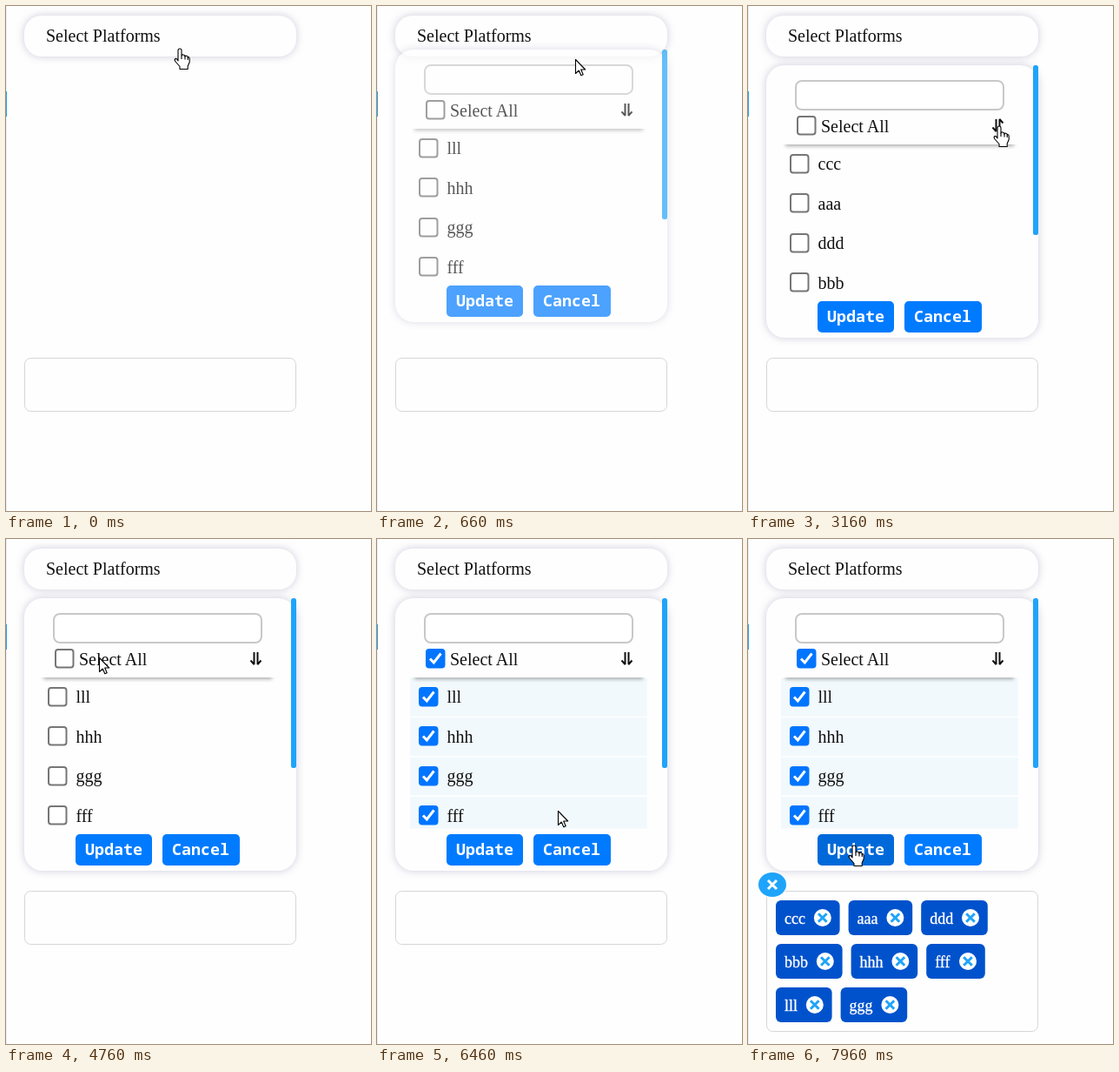
Write an HTML page that moves like this. It is 420 px wide and 580 px high and loops after 8 s.

```html
<!DOCTYPE html>
<html lang="en">
<head>
<meta charset="utf-8">
<title>Platform picker</title>
<style>
  html, body { margin: 0; width: 100%; height: 100%; overflow: hidden; background: #fefefe; }
  svg { display: block; }
  text { font: 20px "Liberation Serif", "Times New Roman", serif; fill: #111; white-space: pre; }
  .card { fill: #fefefe; filter: drop-shadow(0 0 5px rgba(50, 50, 110, .25)); }
  .btn { fill: #007bff; }
  .btn.hover { fill: #0069d9; }
  .btn-text { font: 600 18.33px "Noto Sans Mono", "DejaVu Sans Mono", monospace; fill: #fff; }
  .check rect { fill: #fff; stroke: #767676; stroke-width: 2; }
  .check path { fill: none; stroke: #fff; stroke-width: 3; visibility: hidden; }
  .check.hover rect { stroke: #4f4f4f; }
  .check.on rect { fill: #0075ff; stroke: #0075ff; }
  .check.on.hover rect { fill: #005cc8; stroke: #005cc8; }
  .check.on path { visibility: visible; }
  .row-bg { fill: #f1f9fd; }
  .chip { fill: #0052cc; }
  .chip-text { font-size: 18px; fill: #fff; stroke: #fff; stroke-width: .3; }
  .arrow { fill: none; stroke: #111; stroke-width: 2; stroke-linejoin: bevel; }
  .cursor { fill: #fff; stroke: #000; stroke-width: 1.1; stroke-linejoin: round; }
</style>
</head>
<body>
<svg width="420" height="580" viewBox="0 0 420 580">
  <defs>
    <clipPath id="list-clip"><rect x="30" y="159" width="290" height="173.500"/></clipPath>
    <filter id="soft" x="-10%" y="-300%" width="120%" height="700%"><feGaussianBlur stdDeviation="2.3"/></filter>
  </defs>
  <rect width="420" height="580" fill="#fefefe"/>
  <rect width="1" height="580" fill="#ececfa"/>
  <rect y="98" width="1" height="29" fill="#1d9ff0"/>

  <rect id="box" x="21.500" y="404.500" width="312" height="61" rx="7" fill="#fefefe" stroke="#d6d6d6"/>
  <g id="chips"></g>

  <rect class="card" x="21" y="11" width="313" height="47" rx="20"/>
  <text x="46" y="41">Select Platforms</text>

  <g id="panel">
    <rect class="card" x="21" y="68" width="313" height="313" rx="21"/>
    <rect x="328" y="68" width="6" height="195" rx="2.500" fill="#1fa4fb"/>
    <g id="list" clip-path="url(#list-clip)"></g>
    <rect x="43" y="155" width="263" height="6" fill="#000" opacity=".32" filter="url(#soft)"/>
    <rect x="38" y="80" width="273" height="79" fill="#fefefe"/>
    <rect x="55" y="86" width="239" height="33" rx="7" fill="#fff" stroke="#c8c8c8" stroke-width="2"/>
    <g id="all"></g>
    <text x="84" y="145">Select All</text>
    <path id="sortL" class="arrow" d="M0-7V7L-4 2.500"/>
    <path id="sortR" class="arrow" d="M0-7V7L4 2.500"/>
    <rect id="update" class="btn" x="80" y="339" width="88" height="36" rx="5"/>
    <text class="btn-text" x="91" y="363">Update</text>
    <rect id="cancel" class="btn" x="180" y="339" width="89" height="36" rx="5"/>
    <text class="btn-text" x="191" y="363">Cancel</text>
  </g>

  <path id="arrow" class="cursor" d="M.5.5V16.500L4.300 13 6.800 18.700 9.200 17.700 6.700 12H11.700Z"/>
  <g id="hand" class="cursor">
    <path d="M-2 14V2a2 2 0 0 1 4 0V8q.5-1.500 2-1 1.500 0 2 2 .5-1.300 1.800-.8 1.500.3 1.400 1.900 .4-.7 1.200-.3 .8.500 .8 2V15.500L9.200 20V23.500H0V20.500L-5.300 14.500q-1.200-2 .3-3 1.500-.5 3 2.500Z"/>
    <path fill="none" d="M2 8v4M6 9v3.500M9.200 10v3"/>
  </g>
</svg>
<script>
const LOOP = 8000, OPEN = 455, OPEN_TIME = 500, SELECT = 5360, UPDATE = 7960;
const ROW = 45.4;
const $ = id => document.getElementById(id);
const show = (el, on) => el.style.display = on ? "" : "none";

const names = ["ccc", "aaa", "ddd", "bbb", "hhh", "fff", "lll", "ggg"];
const ascending = [...names].sort();
const orders = [[...ascending].reverse(), names, ascending];
const clicks = [1460, 2060, 2630, 3160, 3700, 4160];

// Pointer stops: time, x, y
const path = [
  [0, 200, 49], [30, 200, 49], [160, 222, 33], [480, 222, 33],
  [660, 228, 61], [900, 259, 101], [1260, 290, 138], [1430, 290, 138],
  [1500, 288, 137], [1899, 288, 137], [1900, 289, 138], [4360, 289, 138],
  [4560, 195, 139], [4760, 107, 136], [5160, 66, 137], [5400, 66, 137],
  [6160, 100, 182], [6460, 208, 312], [6660, 208, 312], [6800, 226, 321],
  [7200, 226, 322], [7350, 212, 350], [7520, 150, 355], [7700, 122, 352],
  [LOOP, 122, 352]
];

const checkbox = (x, y) => `<g class="check" transform="translate(${x} ${y})">
  <rect x="1" y="1" width="20.500" height="20.500" rx="3"/><path d="M5 11.500L9.300 16 17.500 5.500"/></g>`;
const cross = (x, y, r, color) =>
  `<path d="M${x - r} ${y - r}l${2 * r} ${2 * r}m0 ${-2 * r}l${-2 * r} ${2 * r}" stroke="${color}" stroke-width="3"/>`;

$("all").innerHTML = checkbox(56, 126);
$("list").innerHTML = [0, 1, 2, 3].map(i => {
  const y = 160 + i * ROW;
  return `<rect class="row-bg" x="38" y="${y}" width="273" height="43.500"/>
    ${checkbox(48, Math.round(y + 10))}<text class="label" x="80.500" y="${Math.round(y + 28.3)}"></text>`;
}).join("");

function buildChips() {
  const advance = { a: 8, c: 8, f: 6, l: 5 };
  const rows = [names.slice(0, 3), names.slice(3, 6), names.slice(6)];
  let out = "";
  rows.forEach((row, r) => {
    let x = 32;
    const y = 415 + r * 50;
    for (const name of row) {
      const w = 3 * (advance[name[0]] || 9) + 49.6;
      const cx = x + w - 19.8, cy = y + 20;
      out += `<rect class="chip" x="${x}" y="${y}" width="${w}" height="40" rx="6"/>
        <text class="chip-text" x="${x + 10}" y="${y + 27}">${name}</text>
        <circle cx="${cx}" cy="${cy}" r="10" fill="#fff"/>${cross(cx, cy, 4.8, "#1fa4fb")}`;
      x += w + 10;
    }
  });
  return out + `<ellipse cx="28" cy="397" rx="17" ry="15" fill="#fefefe"/>
    <ellipse cx="28" cy="397" rx="16" ry="14" fill="#1fa4fb"/>${cross(28, 397, 5, "#fff")}`;
}
$("chips").innerHTML = buildChips();

const checks = document.querySelectorAll(".check");
const rowBgs = document.querySelectorAll(".row-bg");
const labels = document.querySelectorAll(".label");
const allCheck = $("all").firstElementChild;

// Cubic curve .25 .1 .25 1, solved by bisection
function ease(p) {
  if (p <= 0) return 0;
  if (p >= 1) return 1;
  const curve = (s, a, b) => 3 * s * (1 - s) ** 2 * a + 3 * s * s * (1 - s) * b + s ** 3;
  let lo = 0, hi = 1;
  for (let i = 0; i < 24; i++) {
    const mid = (lo + hi) / 2;
    if (curve(mid, .25, .25) < p) lo = mid; else hi = mid;
  }
  return curve(lo, .1, 1);
}

function pointer(t) {
  const i = path.findIndex(k => k[0] > t);
  const [t0, x0, y0] = path[i - 1], [t1, x1, y1] = path[i];
  const k = (t - t0) / (t1 - t0);
  return [Math.round(x0 + (x1 - x0) * k), Math.round(y0 + (y1 - y0) * k)];
}

function draw(t) {
  const [x, y] = pointer(t);
  const over = (l, top, r, b) => x >= l && x <= r && y >= top && y <= b;
  const opened = t >= OPEN, selected = t >= SELECT, updated = t >= UPDATE;

  const p = ease((t - OPEN) / OPEN_TIME);
  show($("panel"), opened);
  $("panel").setAttribute("opacity", p);
  $("panel").setAttribute("transform", `translate(0 ${-60 * (1 - p)})`);

  const mode = clicks.filter(c => t >= c).length % 3;
  labels.forEach((el, i) => el.textContent = orders[mode][i]);
  $("sortL").setAttribute("transform", `translate(285.500 137) scale(1 ${mode === 2 ? -1 : 1})`);
  $("sortR").setAttribute("transform", `translate(289.500 137) scale(1 ${mode ? -1 : 1})`);

  checks.forEach(el => el.classList.toggle("on", selected));
  allCheck.classList.toggle("hover", opened && over(56, 126, 78, 148));
  rowBgs.forEach(el => show(el, selected));

  const onUpdate = opened && over(80, 339, 168, 375);
  const onCancel = opened && over(180, 339, 269, 375);
  $("update").classList.toggle("hover", onUpdate);
  $("cancel").classList.toggle("hover", onCancel);

  show($("chips"), updated);
  $("box").setAttribute("height", updated ? 161 : 61);

  const hand = !opened || onUpdate || onCancel || over(280, 128, 296, 148);
  show($("hand"), hand);
  show($("arrow"), !hand);
  $(hand ? "hand" : "arrow").setAttribute("transform", `translate(${x} ${y})`);
}

function tick() {
  draw(performance.now() % LOOP);
  requestAnimationFrame(tick);
}
draw(0);
requestAnimationFrame(tick);
</script>
</body>
</html>
```
